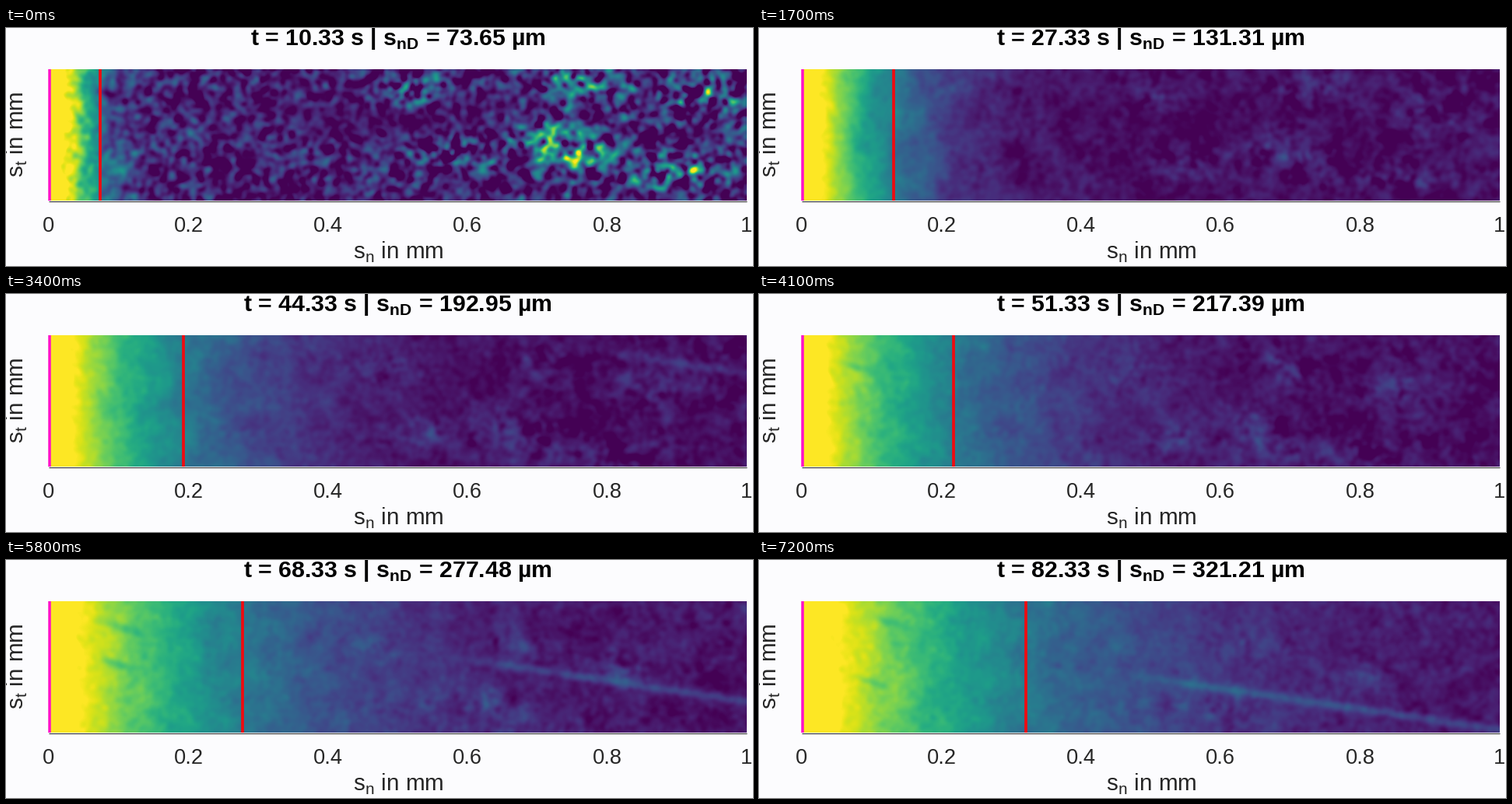
A matplotlib script that plays this animation: 960 px wide and 306 px high, repeating every 7300 ms.

```python
import numpy as np
import matplotlib.pyplot as plt
from matplotlib.animation import FuncAnimation

W, H, DPI = 960, 306, 100
FRAMES, INTERVAL = 73, 100
LEFT, RIGHT, TOP, BOTTOM = 55, 952, 53, 222
MM = 897  # pixels per millimetre
INK = "#262626"

plt.rcParams["font.family"] = "Liberation Sans"

# Key points of the front depth: step, micrometres
DEPTH = np.array([(0, 73.65), (9, 101.48), (17, 131.31), (27, 168.52),
                  (41, 217.39), (58, 277.48), (72, 321.21)])

# Centres of the bright speckle clusters
CLUSTERS = [(520, 80), (735, 64), (893, 88), (575, 160),
            (695, 140), (735, 168), (855, 182)]

NX, NY = 448, 85
xs = LEFT + (np.arange(NX) + 0.5) * (RIGHT - LEFT) / NX
ys = TOP + (np.arange(NY) + 0.5) * (BOTTOM - TOP) / NY
X, Y = np.meshgrid(xs, ys)
KY = 2 * np.pi * np.fft.fftfreq(NY)[:, None]
KX = 2 * np.pi * np.fft.rfftfreq(NX)[None, :]
rng = np.random.default_rng(7)


class Noise:
    """Smooth unit-variance noise that drifts and slowly changes."""

    def __init__(self, size, rate):
        blur = np.exp(-size ** 2 * (KX ** 2 + KY ** 2) / 2)
        self.rate = rate
        self.waves = []
        for _ in range(2):
            wave = np.fft.rfft2(rng.standard_normal((NY, NX))) * blur
            wave[0, 0] = 0
            self.waves.append(wave / np.fft.irfft2(wave, (NY, NX)).std())

    def at(self, n, vx=0.0, vy=0.0):
        a, b = self.waves
        mix = a * np.cos(self.rate * n) + b * np.sin(self.rate * n)
        shift = np.exp(-1j * n * (KX * vx + KY * vy))
        return np.fft.irfft2(mix * shift, (NY, NX))


speckle = Noise(1.6, 0.25)
cloud = Noise(4.5, 0.06)
ripple = Noise(4.5, 0.05)
grain = Noise(1.5, 0.4)


def depth(n):
    return np.interp(n, DEPTH[:, 0], DEPTH[:, 1])


def front_x(n):
    return LEFT + depth(n) * MM / 1000


def ramp(v, start, end):
    return np.clip((v - start) / (end - start), 0, 1)


def spot(x, y, rx, ry, slope=0.0):
    dx = X - x
    return np.exp(-(dx / rx) ** 2 - ((Y - y - slope * dx) / ry) ** 2)


def front(n):
    """Decay from the wall: steep at first, exponential later."""
    u = (X - LEFT) / (front_x(n) - LEFT) * (1 + 0.045 * ripple.at(n))
    power = 1.1 + 0.9 * np.exp(-n / 12)
    return 1.17 * np.exp(-1.08 * np.maximum(u, 0) ** power)


def background(n):
    envelope = 0.19 + 0.08 * ramp(X, 600, 950) - 0.1 * spot(500, 110, 170, 28)
    for x, y in CLUSTERS:
        reach = (x - LEFT) * n / 1000
        envelope += 0.34 * spot(x - 2.1 * reach, y + 1.1 * reach, 42, 22)
    fine = speckle.at(n, -0.3, 0.1)
    soft = cloud.at(n, -0.3, 0.1)
    early = np.exp(-n / 3)
    rough = envelope * (0.62 + 0.5 * fine + 0.15 * soft) - 0.03
    late = 0.27 * (1 - n / 180) * envelope * (0.65 + 0.3 * fine + 0.4 * soft)
    return early * rough + (1 - early) * late


def streak(n):
    """Faint scratch that sinks along the right side."""
    left = FRAMES - 1 - n
    path = 219 - 2.4 * left - 0.0177 * left ** 2 - 0.15 * (RIGHT - X)
    start = 780 - 7.3 * (n - 27)
    power = 0.14 * ramp(n, 21, 27) * (1 - 0.85 * np.exp(-((n - 41) / 7) ** 2))
    return power * np.exp(-((Y - path) / 6) ** 2) * ramp(X, start, start + 110)


def smears(n):
    """Dark trails inside the bright layer."""
    upper = ramp(n, 33, 41) * spot(128 + 1.2 * (n - 41), 95 - 0.5 * (n - 41), 22, 6, 0.3)
    lower = ramp(n, 46, 58) * spot(140, 133 + 1.6 * (n - 58), 20, 6, 0.3)
    inner = ramp(n, 62, 72) * spot(380, 134, 15, 6, 0.4)
    first = np.exp(-n / 3) * spot(130, 84, 24, 8, 0.3)
    return 0.1 * upper + 0.12 * lower + 0.07 * inner + 0.3 * first


def field(n):
    base = front(n)
    texture = background(n) * np.clip(1 - 1.6 * base, 0, 1)
    roughness = 0.014 + 0.035 * np.exp(-n / 3) * ramp(base, 0.1, 0.4)
    return base + texture + streak(n) + roughness * grain.at(n) - smears(n)


def title_text(n):
    return (f"t = {10.33 + n:.2f} s | s$_{{\\mathregular{{nD}}}}$"
            f" = {depth(n):.2f} µm")


def px(size):
    return size * 72 / DPI


fig = plt.figure(figsize=(W / DPI, H / DPI), dpi=DPI, facecolor="#fcfcfe")
ax = fig.add_axes([0, 0, 1, 1])
ax.axis("off")


def label(x, y, text, size, **kw):
    kw = {"color": INK, "ha": "center", "va": "baseline", **kw}
    return ax.text(x, y, text, fontsize=px(size), **kw)


def line(x, y, color, width):
    return ax.plot(x, y, color=color, lw=px(width), solid_capstyle="butt")[0]


image = ax.imshow(field(0), cmap="viridis", vmin=0, vmax=1, interpolation="bilinear",
                  extent=(LEFT, RIGHT, BOTTOM, TOP), aspect="auto")
ax.set_xlim(0, W)
ax.set_ylim(H, 0)

line([LEFT, RIGHT], [222.5, 222.5], INK, 1)
line([55.7, 55.7], [TOP, BOTTOM], "#ff10c8", 3.5)
marker = line([0, 0], [TOP, BOTTOM], "#f00a10", 3.7)

title = label(503.5, 22, title_text(0), 30.2, color="black", weight="bold")
for i in range(6):
    label(LEFT + i * MM / 5, 262, f"{i / 5:g}", 27.2)
label(504, 297, "s$_{\\mathregular{n}}$ in mm", 29.6)
label(22.5, 137, "s$_{\\mathregular{t}}$ in mm", 29.6,
      rotation=90, rotation_mode="anchor")


def update(n):
    image.set_data(field(n))
    marker.set_xdata([front_x(n)] * 2)
    title.set_text(title_text(n))
    return image, marker, title


anim = FuncAnimation(fig, update, frames=FRAMES, interval=INTERVAL,
                     repeat=True, repeat_delay=0, blit=False)
plt.show()
```
